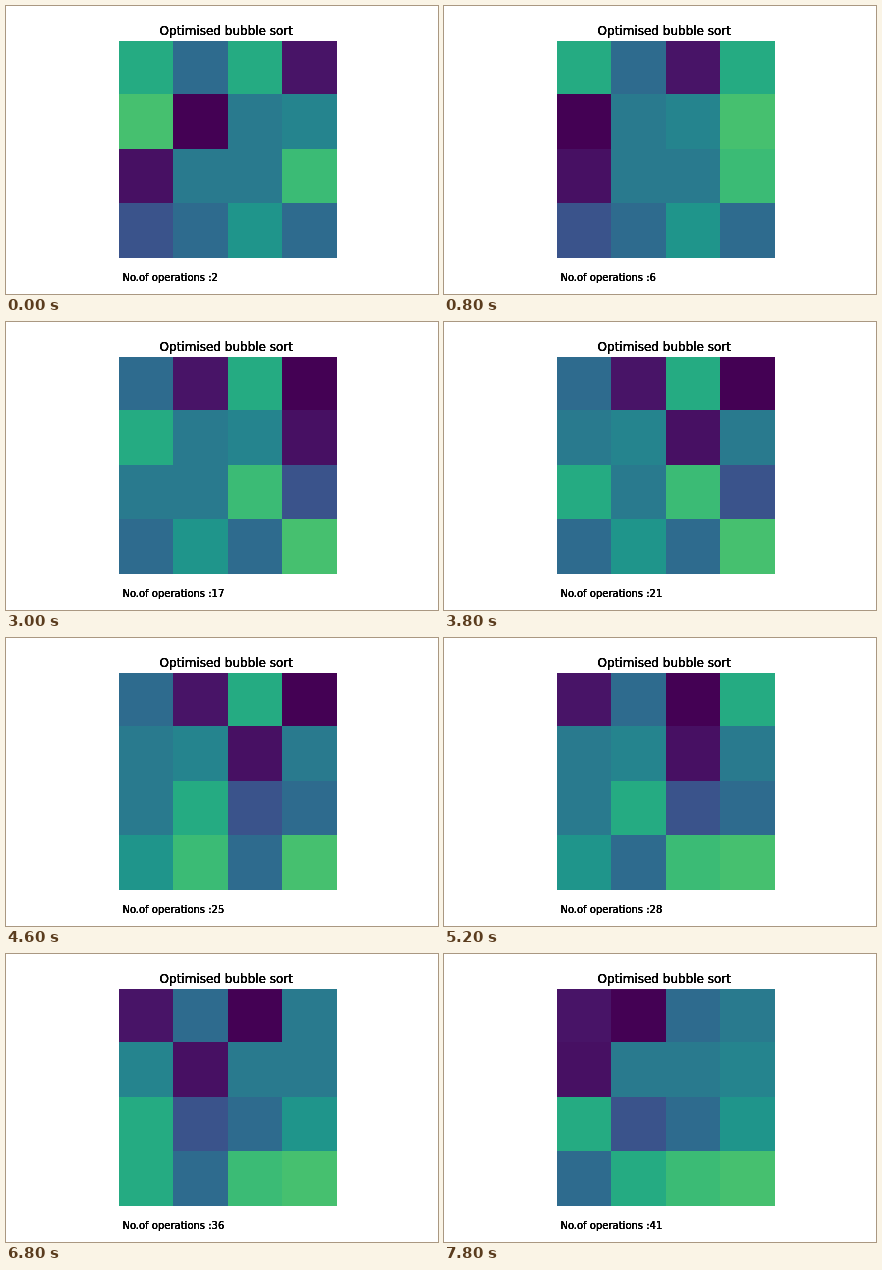
An HTML page with a canvas that plays this animation: 432 by 288 pixels, repeating every 8000 ms.

```html
<!DOCTYPE html>
<html lang="en">
<head>
<meta charset="utf-8">
<title>Optimised bubble sort</title>
<style>
  html, body { margin: 0; width: 100%; height: 100%; overflow: hidden; background: #fff; }
  canvas { display: block; }
</style>
</head>
<body>
<canvas id="stage" width="432" height="288"></canvas>
<script>
const ctx = document.getElementById('stage').getContext('2d');

const STEP = 200;
const STEPS = 40;
const FIRST_COUNT = 2;

// Shades in sorting order; the grid holds indices into this list.
const SHADES = ['#440154', '#471063', '#481467', '#3a538b', '#2e6b8e', '#297a8e',
                '#25848e', '#1f958b', '#25ab82', '#3bbb75', '#46c06f'];
const START = [8, 4, 8, 2,
               10, 0, 5, 6,
               1, 5, 5, 9,
               3, 4, 7, 4];

const COLS = [113, 167, 222, 276, 331];
const ROWS = [35, 88, 143, 197, 252];

// One snapshot per swap.
function sortStates(start, limit) {
  const cells = start.slice();
  const states = [cells.slice()];
  // The opening pass has already reached the third cell.
  let from = 2;
  for (let end = cells.length - 1; end > 0; end--) {
    for (let i = from; i < end; i++) {
      if (cells[i] <= cells[i + 1]) continue;
      [cells[i], cells[i + 1]] = [cells[i + 1], cells[i]];
      states.push(cells.slice());
      if (states.length === limit) return states;
    }
    from = 0;
  }
  return states;
}

const states = sortStates(START, STEPS);

// Repeated passes thicken the antialiased edges.
function heavyText(text, x, y, size) {
  ctx.font = size + 'px "DejaVu Sans", sans-serif';
  ctx.fillStyle = '#000';
  for (let i = 0; i < 4; i++) ctx.fillText(text, x, y);
}

function draw(step) {
  ctx.fillStyle = '#fff';
  ctx.fillRect(0, 0, 432, 288);
  states[step].forEach((value, i) => {
    const c = i % 4, r = Math.floor(i / 4);
    ctx.fillStyle = SHADES[value];
    ctx.fillRect(COLS[c], ROWS[r], COLS[c + 1] - COLS[c], ROWS[r + 1] - ROWS[r]);
  });
  heavyText('Optimised bubble sort', 153.6, 29, 12);
  heavyText('No.of operations :' + (FIRST_COUNT + step), 116.4, 275, 10);
}

const startTime = performance.now();

function tick() {
  const elapsed = performance.now() - startTime;
  draw(Math.floor(elapsed / STEP) % STEPS);
  requestAnimationFrame(tick);
}

tick();
</script>
</body>
</html>
```
